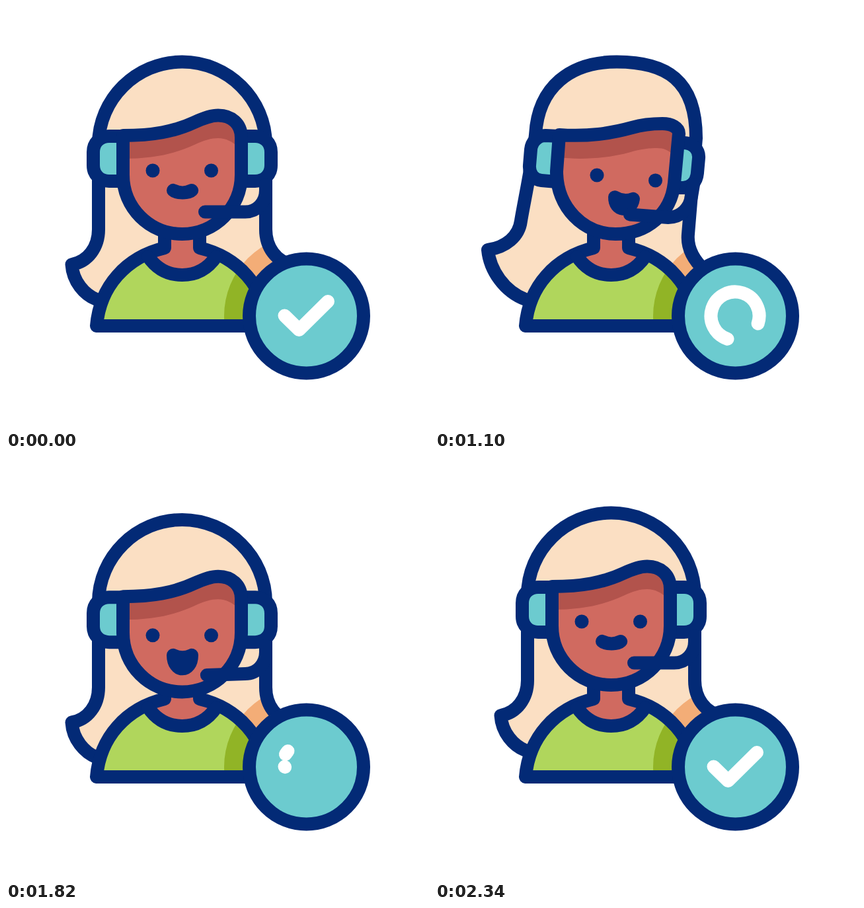
An HTML page for the animation above (2400 ms loop, 640x640 px).

```html
<!DOCTYPE html>
<html lang="en">
<head>
<meta charset="utf-8">
<title>Support agent</title>
<style>
  html, body { margin: 0; width: 100%; height: 100%; overflow: hidden; background: #fff; }
  svg { display: block; width: 100%; height: 100%; }
  .line { fill: none; stroke: #032a76; stroke-width: 20; stroke-linecap: round; stroke-linejoin: round; }
  .mark { fill: none; stroke: #fff; stroke-width: 20; stroke-linecap: round; stroke-linejoin: round; }
  .ink { fill: #032a76; }
  .hair { fill: #fbdfc3; }
  .skin { fill: #d06a60; }
  .teal { fill: #6ccbcf; }
</style>
</head>
<body>
<svg viewBox="0 0 640 640">
  <defs>
    <path id="hair"/>
    <path id="face"/>
    <path id="body" d="M240 345V366C182 380 142 424 137 484H396C391 424 351 380 293 366V345"/>
    <clipPath id="inHair"><use href="#hair"/></clipPath>
    <clipPath id="inFace"><use href="#face"/></clipPath>
    <clipPath id="inBody"><use href="#body"/></clipPath>
  </defs>

  <use href="#hair" class="hair"/>
  <circle cx="454" cy="469" r="124" fill="#f3ad77" clip-path="url(#inHair)"/>
  <use href="#hair" class="line"/>

  <use href="#body" fill="#b0d65c"/>
  <circle cx="454" cy="469" r="124" fill="#91b426" clip-path="url(#inBody)"/>
  <path class="skin" d="M240 345V366L215 377C228 399 246 407 266.500 407C287 407 305 399 318 377L293 366V345Z"/>
  <use href="#body" class="line"/>
  <path class="line" d="M215 379C228 398 246 407 266.500 407C287 407 305 398 318 379"/>

  <path id="padL" class="line teal"/>
  <path id="padR" class="line teal"/>
  <use href="#face" class="skin"/>
  <path id="shade" fill="#b2534c" clip-path="url(#inFace)"/>
  <use href="#face" class="line"/>
  <circle id="eyeL" class="ink" r="10.500"/>
  <circle id="eyeR" class="ink" r="10.500"/>
  <path id="mouth" class="line"/>
  <path id="mic" class="line"/>

  <circle class="line teal" cx="454.500" cy="469" r="86.500"/>
  <circle id="ring" class="mark" r="36.500" pathLength="360"/>
  <path id="check" class="mark" pathLength="100" d="M421.500 468.500L443.500 490L487 447"/>
</svg>
<script>
const LOOP = 2400;
const el = id => document.getElementById(id);
const lerp = (a, b, k) => a + (b - a) * k;

// Cosine ease from 0 to 1 between two times
const ease = (t, from, to) => {
  const u = Math.min(1, Math.max(0, (t - from) / (to - from)));
  return (1 - Math.cos(Math.PI * u)) / 2;
};

const track = (keys, t) => {
  let i = 1;
  while (i < keys.length - 1 && t > keys[i][0]) i++;
  const [t0, a] = keys[i - 1], [t1, b] = keys[i];
  return lerp(a, b, (t - t0) / (t1 - t0));
};

// Each part: rest pose, tilted pose, and nod as a y shift or a third pose
const parts = {
  hair: {
    rest: "M137 444 C119 437 101 417 99.5 391 C124 387 140 365 140 338 C140 295 140 253 140 210 C140 141 197 84.5 266.5 84.5 C336 84.5 393 141 393 210 L393 338 C393 365 409 387 433 391 L388 447",
    tilt: "M137 444 C105 432 83 400 80 369 C107 365 127 349 130 325 C134 300 147 240 152 195 C156 122 205 84.5 275 84.5 C350 84.5 395 112 395 200 L383 345 C381 366 392 385 408 400 L388 447",
    nod: 11
  },
  padL: {
    rest: "M177 197 L156 197 C142 197 132 207 132 221 L132 241 C132 255 142 265 156 265 L177 265",
    tilt: "M188 197 L167 196 C155 196 146 206 145 217 L143 241 C142 254 150 263 161 264 L184 266",
    nod: 16
  },
  padR: {
    rest: "M356 197 L377 197 C391 197 401 207 401 221 L401 241 C401 255 391 265 377 265 L356 265",
    tilt: "M369 206 L378 207 C391 208 400 218 399 230 L397 252 C396 266 388 274 376 275 L364 275",
    nod: 16
  },
  face: {
    rest: "M177 196 C222 196 255 190 285 176 C300 169 310 165.5 321 165.5 C341 165.5 356 178 356 199 L356 255.5 C356 305 316 345 266.5 345 C217 345 177 305 177 255.5 Z",
    tilt: "M188 195 C232 198 265 193 298 184 C315 179 332 178 344 178 C358 178 369 184 369 193 L362 268 C357 315 320 345 273 345 C225 345 184 305 184 250 Z",
    nod: "M177 212 C222 212 255 206 285 192 C300 185 310 181.5 321 181.5 C341 181.5 356 194 356 215 L356 266.5 C356 316 316 356 266.5 356 C217 356 177 316 177 266.5 Z"
  },
  shade: {
    rest: "M177 231 C222 231 255 224 285 210 C300 203 310 200 321 200 C333 200 342 205 352 214 L360 150 L177 150 Z",
    tilt: "M183 229 C222 233 260 231 296 221 C312 216 326 215 336 215 C346 215 353 218 362 226 L380 150 L183 150 Z",
    nod: 16
  },
  mic: {
    rest: "M393 270 L393 279 C393 297 380 311.5 362 311.5 L301 311.5",
    tilt: "M391 270 L388 288 C386 305 372 320 353 320 L295 315.5",
    nod: "M393 286 L393 296 C393 314 380 329 362 329 L304 331"
  }
};

const NUM = /-?\d+(\.\d+)?/g;
const nums = d => d.match(NUM).map(Number);
for (const id in parts) {
  const p = parts[id];
  p.node = el(id);
  p.a = nums(p.rest);
  p.b = nums(p.tilt);
  p.c = typeof p.nod === "string" ? nums(p.nod) : p.a.map((v, i) => v + (i % 2) * p.nod);
}

function pose(p, tilt, nod) {
  let i = 0;
  p.node.setAttribute("d", p.rest.replace(NUM, () => {
    const v = lerp(p.a[i], p.b[i], tilt) + (p.c[i] - p.a[i]) * nod;
    i++;
    return v.toFixed(2);
  }));
}

const place = (id, x, y, turn = 0) =>
  el(id).setAttribute("transform", `translate(${x} ${y}) rotate(${turn})`);

function dash(id, length, offset = 0) {
  const s = el(id).style;
  s.visibility = length > 0.3 ? "visible" : "hidden";
  s.strokeDasharray = `${length} 1000`;
  s.strokeDashoffset = offset;
}

const spin = [[680, -70], [1100, 108], [1380, 209], [1680, 282], [1840, 315]];

function drawMouth(t, tilt, nod) {
  const open = t > 455 && t < 1935 ? (1 - Math.cos((t - 455) / 370 * 2 * Math.PI)) / 2 : 0;
  const x = lerp(9.3, 16, open), y = lerp(4.7, 38, open);
  el("mouth").setAttribute("d", `M-14 0Q0 7 14 0C${x} ${y} ${-x} ${y} -14 0Z`);
  el("mouth").style.fill = open > 0.5 ? "#fff" : "#032a76";
  place("mouth", 267 + 19 * tilt, 279 + 11.5 * tilt + 22 * nod, 5.5 * tilt);
}

function drawBadge(t) {
  const cut = 270 * ease(t, 1680, 1840);
  const span = 270 * ease(t, 680, 980) - cut;
  place("ring", 454, 469, track(spin, t) + cut);
  dash("ring", span);

  const gone = 100 * ease(t, 220, 690);
  if (t < 1000) dash("check", 100 - gone, -gone);
  else dash("check", 100 * ease(t, 1800, 2130));
}

function draw(t) {
  const tilt = ease(t, 220, 620) - ease(t, 1100, 1500);
  const nod = ease(t, 1480, 1880) - ease(t, 1980, 2340);
  for (const id in parts) pose(parts[id], tilt, nod);
  place("eyeL", 222 + 23 * tilt, 249 + 7 * tilt + 22 * nod);
  place("eyeR", 310.5 + 23 * tilt, 249 + 15 * tilt + 22 * nod);
  drawMouth(t, tilt, nod);
  drawBadge(t);
}

function tick() {
  draw(performance.now() % LOOP);
  requestAnimationFrame(tick);
}
tick();
</script>
</body>
</html>
```
